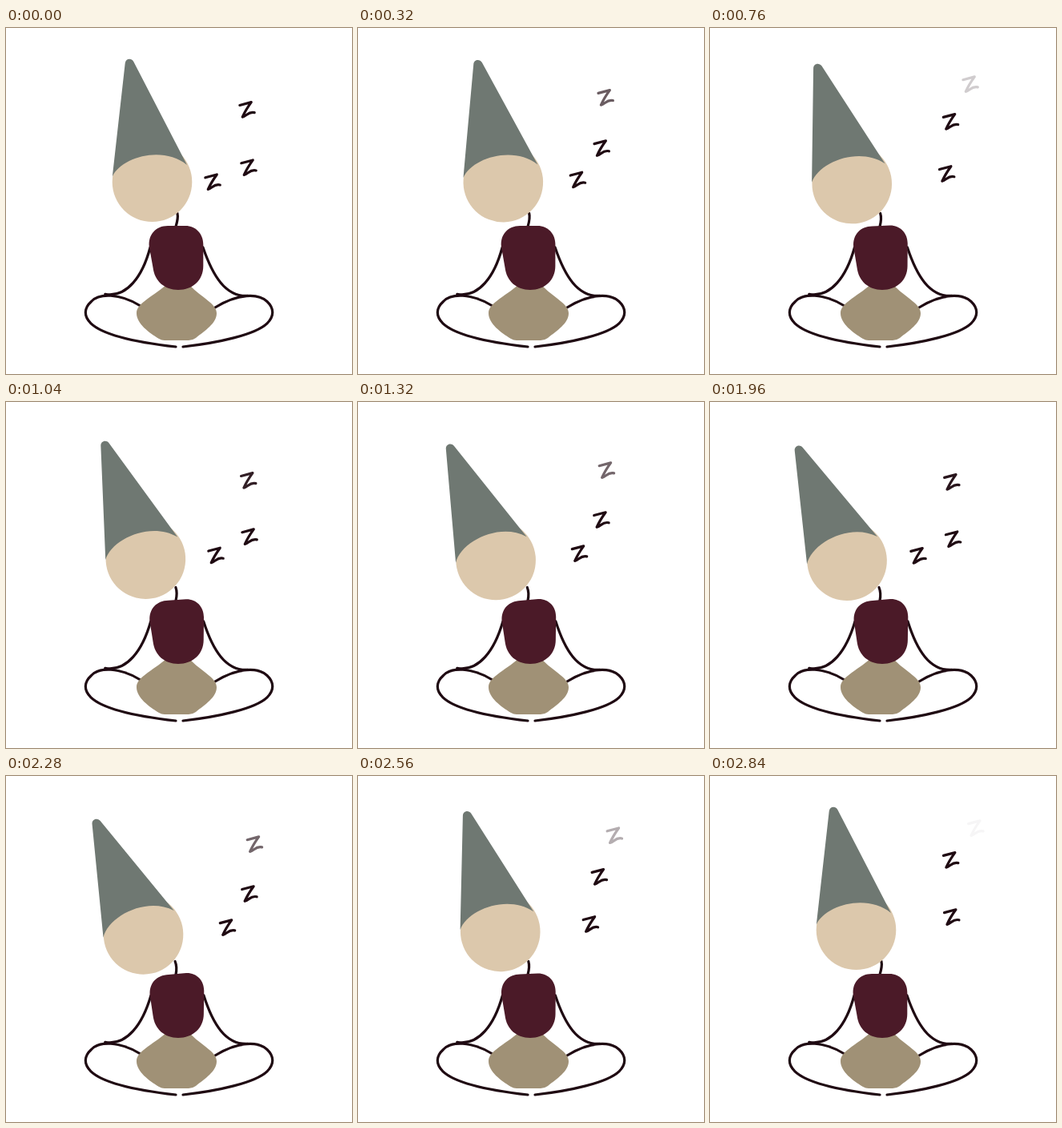
An HTML page that plays this animation: 432 by 432 pixels, repeating every 2.88 s.

```html
<!DOCTYPE html>
<html lang="en">
<head>
<meta charset="utf-8">
<title>Dozing gnome</title>
<style>
  html, body { margin: 0; width: 100%; height: 100%; overflow: hidden; background: #fff; }
  svg { display: block; width: 100%; height: 100%; }
  .line { fill: none; stroke: #1f0a12; stroke-width: 3.2; stroke-linecap: round; stroke-linejoin: round; }
</style>
</head>
<body>
<svg viewBox="0 0 432 432">
  <g class="line">
    <path d="M167 346.500C142 331 116 331 106.500 341.500C97 350 97 360 106 368.800C122 384 168 393 212 398"/>
    <path d="M261 349C290 331 315 331 326 341.500C335 350 335 360 326 368.800C311 383 265 393 221 398"/>
    <path id="leftArm"/>
    <path id="rightArm"/>
    <path id="neck"/>
  </g>
  <path fill="#a09176" d="M203 318C185 335 163 343 163 356C163 369 178 380 191 388Q194 390 198 390H228Q233 390 237 387C248 378 263 369 263 356C263 343 240 335 227 318Z"/>
  <path id="torso" fill="#4b1a28"/>
  <g id="head">
    <circle cx="182.500" cy="192.200" r="49.800" fill="#dcc8ac"/>
    <path fill="#6f7872" d="M148.700 44L132.800 185.500C144 161 196 146.300 226 171L159.300 42C156.500 37 149.300 38 148.700 44Z"/>
  </g>
  <g id="snores" class="line"></g>
</svg>
<script>
const LOOP = 2880, LEG = LOOP / 3;
const $ = id => document.getElementById(id);

// Three joined curves that each "z" follows, one per third of the loop.
const route = [
  [[258, 192], [273.6, 188.5], [293, 189.5], [303, 174]],
  [[303, 174], [308.5, 150], [297.8, 125.5], [301, 101.7]],
  [[301, 101.7], [307.3, 85.3], [319.6, 73], [333.5, 63.7]]
];

const snores = route.map(() => {
  const z = document.createElementNS('http://www.w3.org/2000/svg', 'path');
  z.setAttribute('d', 'M-9.200 -5.200L5.200 -9Q-2 1 -5.800 9.500C-1 8.500 2 2 9.200 4');
  return $('snores').appendChild(z);
});

const smooth = (from, to, t) => {
  const x = Math.min(1, Math.max(0, (t - from) / (to - from)));
  return x * x * (3 - 2 * x);
};

const bezier = (points, u) => [0, 1].map(axis => {
  const [a, b, c, d] = points.map(p => p[axis]), v = 1 - u;
  return v * v * v * a + 3 * v * v * u * b + 3 * v * u * u * c + u * u * u * d;
});

function drawBody(k) {
  $('head').setAttribute('transform', `rotate(${-12.6 * k} 204 247)`);
  $('neck').setAttribute('d', `M${214 - 3 * k} 231.500C${215.3 - 2 * k} 237 ${213.5 - 0.5 * k} 243 212 248`);
  $('torso').setAttribute('d',
    `M${202 + k} ${247 + k}L${224 + k} ${247 - k}` +
    `C${237 + k} ${247 - 1.5 * k} ${246.3 + k} ${257 - 2 * k} ${246.3 + k} ${270 - 2 * k}` +
    `L${246.3 + 0.6 * k} 297C${246.3 + 0.6 * k} 315 233 327 215 327C198 327 185.500 316 183.500 299` +
    `L${178.8 + k} ${273 + k}C${177.3 + k} ${258 + k} ${187 + k} ${247 + 1.5 * k} ${202 + k} ${247 + k}Z`);
  $('leftArm').setAttribute('d', `M${180 + k} 274C170.500 310 151 337 123.800 332.300`);
  $('rightArm').setAttribute('d', `M${246 + k} 274C258 309 274 336 302 334.300`);
}

function drawSnores(t) {
  snores.forEach((z, i) => {
    const age = (t + i * LEG) % LOOP;
    const leg = Math.floor(age / LEG), u = age / LEG - leg;
    z.setAttribute('transform', `translate(${bezier(route[leg], u)})`);
    z.setAttribute('opacity', leg === 2 ? 1 - u : 1);
  });
}

const start = performance.now();
function frame() {
  const t = (performance.now() - start) % LOOP;
  drawBody(smooth(0, 1640, t) - smooth(2200, 2840, t));
  drawSnores(t);
  requestAnimationFrame(frame);
}
frame();
</script>
</body>
</html>
```
